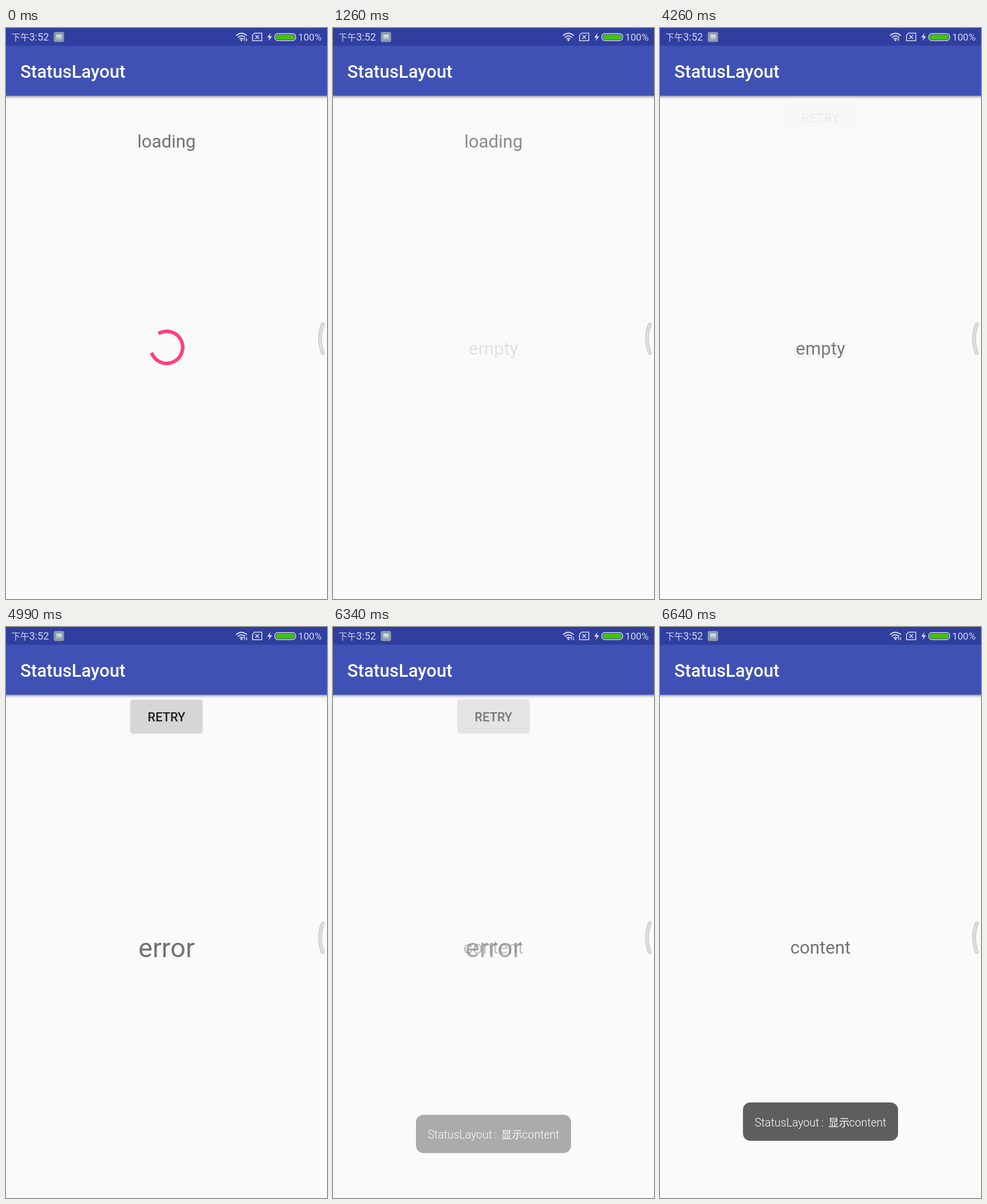
An HTML page for the animation above (8000 ms loop, 561x998 px).

```html
<!DOCTYPE html>
<html lang="zh">
<head>
<meta charset="utf-8">
<title>StatusLayout</title>
<style>
  html, body { margin: 0; width: 100%; height: 100%; overflow: hidden; background: #fafafa; }
  svg { display: block; width: 100%; height: 100%; }
  text { font-family: Roboto, "Noto Sans CJK SC", "Noto Sans CJK", sans-serif; }
  .cjk { font-family: "Noto Sans CJK SC", "Noto Sans CJK", sans-serif; }
  .label { font-size: 31.17px; fill: #737373; text-anchor: middle; }
  .status { fill: #d3d7ef; }
  .line { fill: none; stroke: #d3d7ef; }
</style>
</head>
<body>
<svg viewBox="0 0 561 998">
  <defs>
    <filter id="barShadow" x="-5%" y="-20%" width="110%" height="150%">
      <feDropShadow dx="0" dy="2" stdDeviation="2" flood-opacity=".4"/>
    </filter>
    <filter id="buttonShadow" x="-10%" y="-20%" width="120%" height="150%">
      <feDropShadow dx="0" dy="1" stdDeviation="1.2" flood-opacity=".3"/>
    </filter>
  </defs>
  <rect width="561" height="998" fill="#fafafa"/>

  <rect x="-10" y="20" width="581" height="98.5" fill="#3f51b5" filter="url(#barShadow)"/>
  <rect width="561" height="31" fill="#303f9f"/>
  <text x="25" y="87" font-size="31.17" font-weight="500" fill="#fff">StatusLayout</text>

  <g class="status">
    <text y="22.3" font-size="18"><tspan class="cjk" x="9.5" font-size="15.5">下午</tspan><tspan x="40.5">3:52</tspan></text>
    <text x="510.5" y="22.3" font-size="17">100%</text>
    <rect x="83.5" y="7" width="18" height="17.5" rx="3" fill="#8c9dab"/>
    <path d="M88 12.7h9.5M88 15.7h9.5" stroke="#fff" stroke-width="1.8"/>
    <path d="M88 18.7h9.5" stroke="#c5cfd6" stroke-width="1.5"/>
    <g class="line" stroke-width="2">
      <path d="M402 13.2Q411.5 5.2 421 13.2M405 16.4Q411.5 11 418 16.4M408 19.3Q411.5 16.7 415 19.3"/>
    </g>
    <circle cx="411.5" cy="21.3" r="1.7"/>
    <path id="upArrow" d="M415.2 19.6l1.6-2.4 1.6 2.4h-1v3.6h-1.2v-3.6z"/>
    <path id="downArrow" d="M418.8 20.8l1.6 2.4 1.6-2.4h-1v-3.6h-1.2v3.6z"/>
    <path class="line" stroke-width="1.6" d="M434.3 9h12.7v13.2h-16.2v-9.5zM435.8 12.5l6.4 6.4M442.2 12.5l-6.4 6.4"/>
    <path d="M462.3 8.8l-5.8 8h4l-1.7 6 6.4-8.4h-4.1z"/>
    <rect x="469.7" y="9.7" width="36.6" height="12.3" rx="5.5" fill="none" stroke="#d3d7ef" stroke-width="1.4"/>
    <rect x="471.4" y="11.4" width="33.2" height="8.9" rx="4" fill="#45c300"/>
  </g>

  <g id="loading">
    <text class="label" x="280.5" y="208.5">loading</text>
    <path id="spinner" fill="none" stroke="#ff4081" stroke-width="6.23" stroke-linecap="square"/>
  </g>
  <text id="empty" class="label" x="280.5" y="570.5">empty</text>
  <text id="content" class="label" x="280.5" y="570.5">content</text>
  <g id="error">
    <rect x="218" y="127.3" width="125" height="57.2" rx="3" fill="#d6d6d6" filter="url(#buttonShadow)"/>
    <text x="280.5" y="164.5" font-size="21.8" font-weight="500" fill="#212121" text-anchor="middle">RETRY</text>
    <text class="label" x="280.5" y="576.5" style="font-size:46.75px">error</text>
  </g>

  <g fill="none" stroke-linecap="round">
    <path d="M553.6 518Q544 543 553.6 568" stroke="#bdbdbd" stroke-width="6.4"/>
    <path d="M553.6 518Q544 543 553.6 568" stroke="#dedede" stroke-width="4.6"/>
  </g>

  <g id="toast">
    <rect x="145" y="831" width="271" height="67" rx="13" fill="#5e5e5e"/>
    <text y="872.7" font-size="19.5" font-weight="300" fill="#fff"><tspan x="165.5">StatusLayout</tspan><tspan x="282">:</tspan><tspan class="cjk" x="294" font-size="18.7">显示</tspan><tspan x="330.5">content</tspan></text>
  </g>
</svg>
<script>
const LOOP = 8000, FADE = 200, SPIN = 1333;
const TO_EMPTY = 1225, TO_ERROR = 4250, TO_CONTENT = 6260;
const TOAST_START = 6165, TOAST_TIME = 475;
const el = id => document.getElementById(id);
const clamp = v => Math.min(1, Math.max(0, v));
const progress = (t, start, duration) => clamp((t - start) / duration);
const show = (id, alpha) => el(id).setAttribute('opacity', alpha);

// cubic-bezier(.4, 0, .2, 1)
function standardEase(x) {
  x = clamp(x);
  let low = 0, high = 1;
  for (let i = 0; i < 24; i++) {
    const s = (low + high) / 2, r = 1 - s;
    if (1.2 * s * r * r + 0.6 * s * s * r + s ** 3 < x) low = s; else high = s;
  }
  return low * low * (3 - 2 * low);
}

function spinnerPath(t) {
  const phase = (0.45 + t / SPIN) % 1;
  const base = -155 + 0.146 * t + 90 * phase;
  const start = base + 270 * standardEase(2 * phase - 1);
  const end = Math.max(start + 1, base + 270 * standardEase(2 * phase));
  const point = deg => {
    const a = deg * Math.PI / 180;
    return `${280.8 + 28.04 * Math.cos(a)} ${558.2 + 28.04 * Math.sin(a)}`;
  };
  return `M${point(start)}A28.04 28.04 0 ${end - start > 180 ? 1 : 0} 1 ${point(end)}`;
}

function render(t) {
  const toEmpty = progress(t, TO_EMPTY, FADE);
  const toError = progress(t, TO_ERROR, FADE);
  const toContent = progress(t, TO_CONTENT, FADE);
  show('loading', 1 - toEmpty);
  show('empty', toEmpty * (1 - toError));
  show('error', toError * (1 - toContent));
  show('content', toContent);

  show('spinner', t < TO_EMPTY ? 1 : 0);
  el('spinner').setAttribute('d', spinnerPath(t));

  const idle = t >= 1000 && t < 2000;
  show('upArrow', idle ? 0 : 1);
  show('downArrow', idle || (t >= 3000 && t < 4990) ? 0 : 1);

  const rise = 1 - (1 - progress(t, TOAST_START, TOAST_TIME)) ** 1.5;
  show('toast', rise);
  el('toast').setAttribute('transform', `translate(0 ${43 * (1 - rise)})`);
}

const begin = performance.now();
function tick() {
  render((performance.now() - begin) % LOOP);
  requestAnimationFrame(tick);
}
tick();
</script>
</body>
</html>
```
